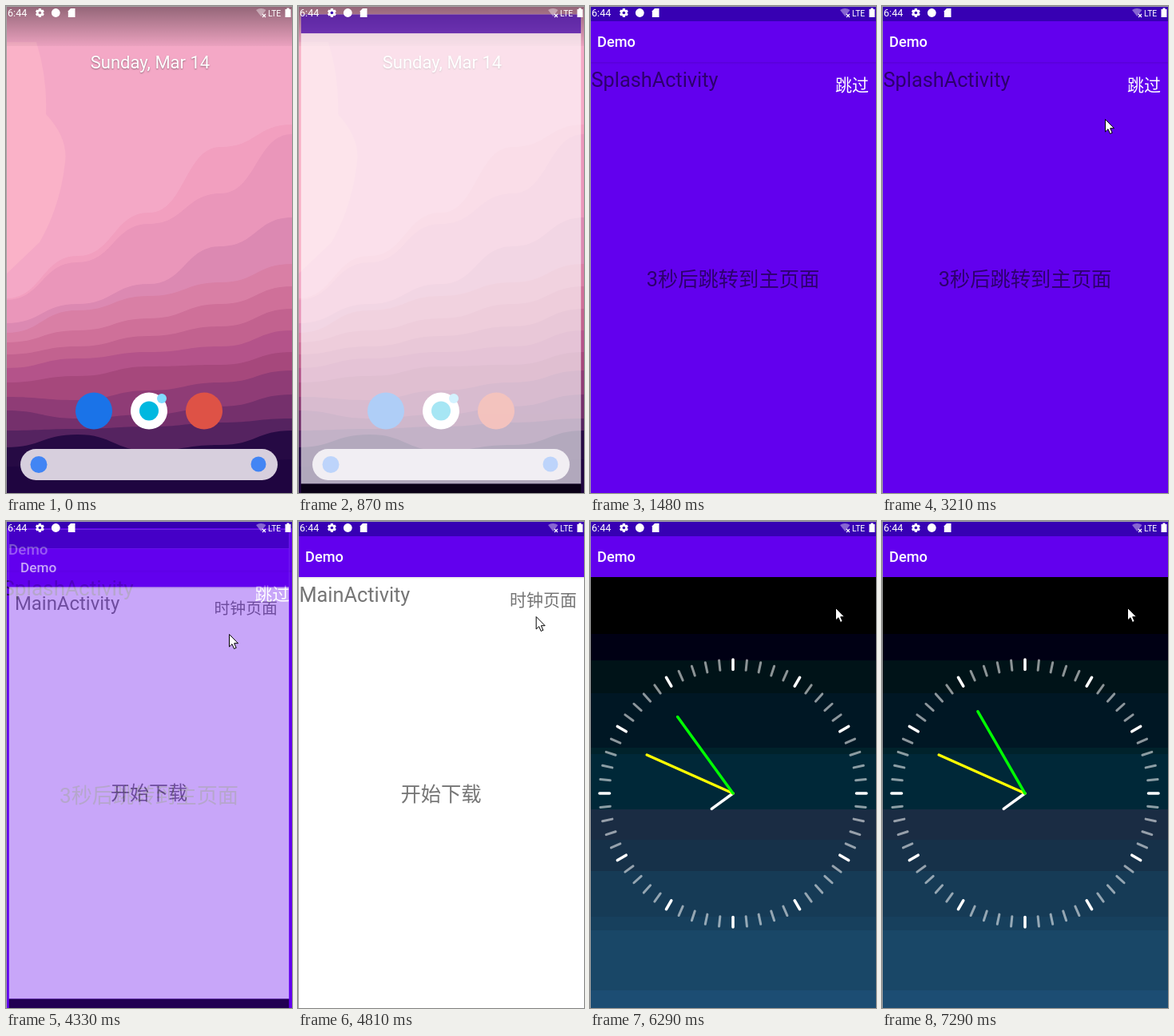
These frames come from a looping animation (358 by 608 pixels, 8 s). An HTML page:

```html
<!DOCTYPE html>
<html lang="zh-CN">
<head>
<meta charset="utf-8">
<title>Demo</title>
<style>
  html, body { margin: 0; width: 100%; height: 100%; overflow: hidden; background: #000; }
  svg { display: block; width: 100vw; height: 100vh; }
  text { font-family: Roboto, 'Noto Sans CJK SC', 'Noto Sans CJK', sans-serif; white-space: pre; }
  .title { font-size: 18.2px; font-weight: 500; fill: #fff; }
  .big { font-size: 25.3px; fill: #000; fill-opacity: .54; }
  .link { font-size: 21px; text-anchor: end; }
  .mid { text-anchor: middle; }
</style>
</head>
<body>
<svg id="stage" viewBox="0 0 358 608" xmlns="http://www.w3.org/2000/svg"></svg>
<script>
const LOOP = 8000, STEP = 120, CX = 179, CY = 304;
const ZOOM = [.947, .99, 1], FADE = [.65, 1, 1];
const VIOLET = '#6200ee', DEEP = '#3700b3';

const rect = (x, y, w, h, fill, extra = '') =>
  `<rect x="${x}" y="${y}" width="${w}" height="${h}" fill="${fill}" ${extra}/>`;
const circle = (x, y, r, fill) => `<circle cx="${x}" cy="${y}" r="${r}" fill="${fill}"/>`;
const text = (x, y, cls, str, extra = '') =>
  `<text x="${x}" y="${y}" class="${cls}" ${extra}>${str}</text>`;
const group = (id, body) => `<g id="${id}">${body}</g>`;
// A full-width band; windows reach a little beyond the stage
const band = (y, end, fill) => rect(-6, y, 370, end - y, fill);

// Smooth hill line through five evenly spaced heights
function ridge(fill, ys) {
  const dx = 358 / (ys.length - 1);
  let d = `M0 608V${ys[0]}`;
  for (let i = 1; i < ys.length; i++) {
    const x = i * dx, m = x - dx / 2;
    d += `C${m} ${ys[i - 1]} ${m} ${ys[i]} ${x} ${ys[i]}`;
  }
  return `<path d="${d}V608Z" fill="${fill}"/>`;
}

function homeScreen() {
  const hills = [
    ['#f29fbf', 365, 312, 258, 176, 148],
    ['#ea96ba', 367, 320, 272, 234, 160],
    ['#dc89b2', 396, 372, 347, 300, 264],
    ['#d97fa5', 408, 380, 362, 345, 322],
    ['#cf7099', 420, 405, 390, 372, 350],
    ['#c2628f', 435, 425, 412, 400, 378],
    ['#b4538a', 452, 440, 432, 425, 405],
    ['#a6487c', 470, 462, 450, 448, 432],
    ['#8f3c76', 488, 492, 480, 470, 455],
    ['#75306c', 505, 515, 510, 500, 485],
    ['#552360', 530, 528, 525, 520, 515],
    ['#260a44', 551, 535, 555, 548, 530],
    ['#1f0540', 575, 572, 580, 578, 566]
  ];
  return rect(0, 0, 358, 608, '#f4a8c6') +
    '<path d="M0 45H38Q52 90 50 135Q78 165 74 195Q68 250 42 295L0 335Z" fill="#fab2c8"/>' +
    hills.map(([fill, ...ys]) => ridge(fill, ys)).join('') +
    rect(0, 0, 358, 50, 'url(#shade)') +
    text(180.5, 78, 'mid', 'Sunday, Mar 14',
      'font-size="22" fill="#fff" style="text-shadow:0 1px 2px #0006"') +
    circle(110, 505.5, 23, '#1a73e8') +
    circle(179, 505.5, 23, '#fff') + circle(179, 505.5, 12, '#00b8e0') +
    circle(195, 490, 6, '#80dcff') +
    circle(248, 505.5, 23, '#de5246') +
    rect(18, 553, 322, 39, '#d7cfdd', 'rx="19.5"') +
    circle(41, 572.5, 10.5, '#4285f4') + circle(316, 572, 9.5, '#4285f4');
}

const frame = (body, bg) => band(-6, 613, bg) + body + band(-6, 19, DEEP) + band(613, 650, '#000');
const appBar = band(19, 70, VIOLET) + text(9, 51, 'title', 'Demo') +
  rect(-6, 70, 370, 3, 'url(#drop)');

const polar = (r, deg) => {
  const a = deg * Math.PI / 180;
  return [CX + r * Math.sin(a), 340 - r * Math.cos(a)];
};
function spoke(from, to, deg, color, width, id = '') {
  const [x1, y1] = polar(from, deg), [x2, y2] = polar(to, deg);
  return `<line ${id && `id="${id}"`} x1="${x1}" y1="${y1}" x2="${x2}" y2="${y2}" ` +
    `stroke="${color}" stroke-width="${width}" stroke-linecap="round"/>`;
}

function clockFace() {
  const sky = [[70, '#000'], [141, '#000014'], [174, '#001318'], [215, '#001724'],
    [283, '#00222b'], [291, '#002838'], [360, '#1a2c43'], [398, '#163149'],
    [437, '#163b56'], [494, '#17405d'], [511, '#194767'], [586, '#1c4d73']];
  let out = sky.map(([y, fill], i) => band(y, i + 1 < sky.length ? sky[i + 1][0] : 613, fill)).join('');
  for (let i = 0; i < 60; i++) {
    out += i % 5 ? spoke(154.5, 167, i * 6, 'rgba(255,255,255,.55)', 3)
                 : spoke(154.5, 167, i * 6, '#fff', 3.6);
  }
  return out + spoke(0, 33, 234, '#fff', 3.5) + spoke(0, 118, 294, '#ff0', 3.5) +
    spoke(0, 118, 0, '#0f0', 3.5, 'second');
}

function statusIcons() {
  let teeth = '';
  for (let a = 0; a < 180; a += 60) {
    teeth += rect(40.7, 3, 3.4, 11, '#fff', `rx=".8" transform="rotate(${a} 42.4 8.5)"`);
  }
  return text(2, 13, '', '6:44', 'font-size="12.6" fill="#fff"') +
    teeth + '<circle cx="42.4" cy="8.5" r="3" fill="none" stroke="#fff" stroke-width="2.4"/>' +
    '<circle id="hub" cx="42.4" cy="8.5" r="1.8"/>' +
    circle(62.3, 8.5, 5.4, '#fff') +
    '<path d="M81 3H86.5V14H77.8V6.2Z" fill="#fff"/>' +
    '<path d="M313 5Q319 .8 325.5 5L319.3 13Z" fill="#fff" fill-opacity=".4"/>' +
    '<path d="M321 10L325 14M325 10L321 14" stroke="#fff" stroke-width="1.2"/>' +
    text(328, 12.5, '', 'LTE', 'font-size="10.3" fill="#fff"') +
    '<path d="M349.5 4H351.5V2.6H354.5V4H356.5V14H349.5Z" fill="#fff"/>';
}

const gradient = (id, from, to) =>
  `<linearGradient id="${id}" x2="0" y2="1"><stop stop-color="#000" stop-opacity="${from}"/>` +
  `<stop offset="1" stop-color="#000" stop-opacity="${to}"/></linearGradient>`;

document.getElementById('stage').innerHTML =
  '<defs>' + gradient('shade', .4, .04) + gradient('drop', .1, 0) + '</defs>' +
  group('home', homeScreen()) +
  group('blank', frame('', '#fff')) +
  group('splash', frame(appBar +
    text(1.5, 100.5, 'big', 'SplashActivity') +
    text(349, 106, 'link', '跳过', 'fill="#fff"') +
    text(CX, 350, 'big mid', '3秒后跳转到主页面'), VIOLET)) +
  group('main', frame(appBar +
    text(1.5, 100.5, 'big', 'MainActivity') +
    text(349, 106, 'link', '时钟页面', 'fill="#000" fill-opacity=".54"') +
    text(CX, 350, 'big mid', '开始下载'), '#fff')) +
  group('clock', frame(clockFace() + appBar, '#000')) +
  group('status', statusIcons()) +
  group('cursor', '<path d="M.5 .5V16L4 12.7L6.5 18.5L9.2 17.3L6.7 11.7H11.5Z" fill="#fff" stroke="#000"/>') +
  rect(0, 0, 358, 1, '#a3a3a3') + rect(0, 0, 1, 608, '#a3a3a3');

const el = id => document.getElementById(id);

// Index of the held step, or -1 before the start
const stepAt = (t, start, count) =>
  t < start ? -1 : Math.min(count - 1, Math.floor((t - start) / STEP));

function place(id, shown, scale = 1, alpha = 1) {
  const g = el(id);
  g.style.display = shown ? '' : 'none';
  g.setAttribute('opacity', alpha);
  g.setAttribute('transform', `translate(${CX} ${CY}) scale(${scale}) translate(${-CX} ${-CY})`);
}

const mix = (a, b, k) => a + (b - a) * k;

function moveCursor(t) {
  const enter = stepAt(t, 2850, 4), click = stepAt(t, 4690, 3);
  const k = Math.sin((enter / 3) * Math.PI / 2), m = (click + 1) / 3;
  el('cursor').style.display = enter < 0 ? 'none' : '';
  const x = mix(mix(311, 279, k), 307, m), y = mix(mix(2, 141, k), 108, m);
  el('cursor').setAttribute('transform', `translate(${x} ${y})`);
}

function draw(t) {
  const launch = stepAt(t, 870, 3), splash = stepAt(t, 1360, 2);
  const main = stepAt(t, 4330, 3), clock = stepAt(t, 5430, 3);

  place('home', launch < 1);
  place('blank', launch >= 0 && splash < 1, ZOOM[launch] || 1, FADE[launch] || 1);
  place('splash', splash >= 0 && main < 1, main < 0 ? 1 : 1.035, splash ? 1 : .6);
  place('main', main >= 0 && clock < 0, ZOOM[main] || 1, FADE[main] || 1);
  place('clock', clock >= 0, [.977, .995, 1][clock] || 1);
  el('hub').setAttribute('fill', launch < 0 ? '#a8798e' : DEEP);

  const sec = 53 + (t >= 6290) + (t >= 7290);
  const [x, y] = polar(118, sec * 6);
  el('second').setAttribute('x2', x);
  el('second').setAttribute('y2', y);
  moveCursor(t);
}

const began = performance.now();
function tick() {
  draw((performance.now() - began) % LOOP);
  requestAnimationFrame(tick);
}
tick();
</script>
</body>
</html>
```
